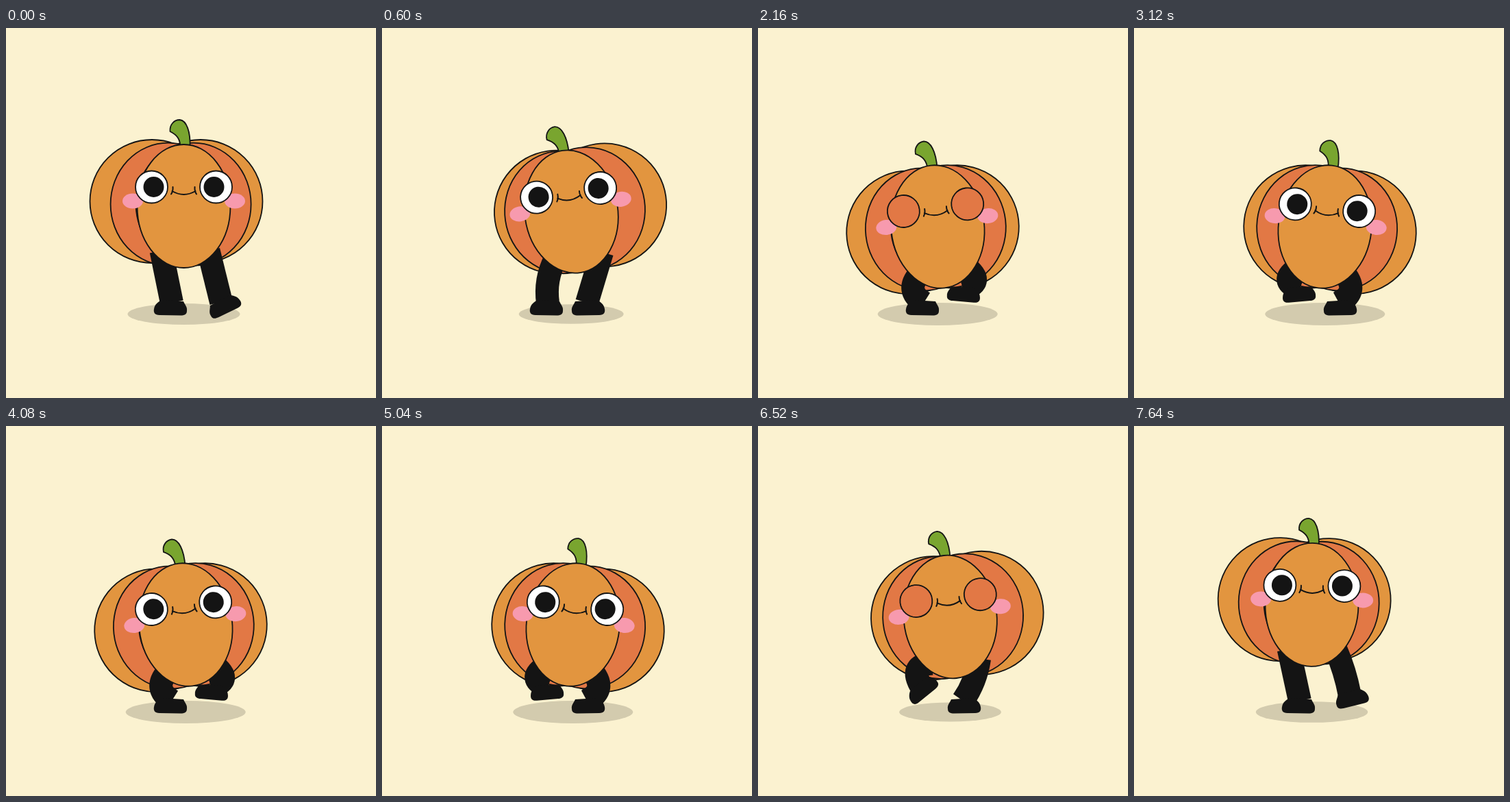
Write an HTML page with a canvas that moves like this. It is 540 px wide and 540 px high and loops after 7.68 s.

```html
<!DOCTYPE html>
<html lang="en">
<head>
<meta charset="utf-8">
<title>Dancing pumpkin</title>
<style>
  html, body { margin: 0; width: 100%; height: 100%; overflow: hidden; background: #fbf2d0; }
  canvas { display: block; width: 540px; height: 540px; }
</style>
</head>
<body>
<canvas id="stage" width="540" height="540"></canvas>
<script>
const ctx = document.getElementById('stage').getContext('2d');
const LOOP = 7680, CYCLE = 1920, HALF = CYCLE / 2, STEP = 40, MID = 270.5;
const INK = '#141414', ORANGE = '#e2953f', RED = '#e27845', GREEN = '#79a52f',
      PINK = '#f79aae', SHADE = '#d3cbae', PAPER = '#fbf2d0';
const BLINKS = [2160, 6520];

// Periodic monotone spline through [time, value] keys.
function track(keys, period) {
  const n = keys.length;
  const at = i => {
    const turn = Math.floor(i / n), k = keys[i - turn * n];
    return [k[0] + turn * period, k[1]];
  };
  const rise = i => (at(i + 1)[1] - at(i)[1]) / (at(i + 1)[0] - at(i)[0]);
  const slope = i => {
    const a = rise(i - 1), b = rise(i);
    return a * b <= 0 ? 0 : 2 * a * b / (a + b);
  };
  return time => {
    const t = ((time % period) + period) % period;
    let i = n - 1;
    while (i > 0 && keys[i][0] > t) i--;
    const [t0, v0] = at(i), [t1, v1] = at(i + 1);
    const d = t1 - t0, u = (t - t0) / d, w = 1 - u;
    return v0 * (1 + 2 * u) * w * w + v1 * u * u * (3 - 2 * u) +
           d * u * w * (slope(i) * w - slope(i + 1) * u);
  };
}

// Sways are repeated with the opposite sign in the second half of the cycle.
const sway = keys => track(keys.concat(keys.map(([t, v]) => [t + HALF, -v])), CYCLE);
const bob = keys => track(keys, HALF);

const frontX = sway([[0, -11], [240, -8.3], [480, 1], [760, 10]]);
const hullX = sway([[0, -22], [80, -24], [160, -22.3], [240, -15.5], [320, -7.5],
                    [480, 11], [640, 20], [760, 20.3], [880, 21.7]]);
const tilt = sway([[0, 0], [240, -6.5], [480, -9], [760, -6], [880, -1.6]]);
const frontY = bob([[0, 260], [240, 290], [480, 256], [720, 280], [760, 278.5], [880, 263]]);
const hullY = bob([[0, 253], [240, 294.3], [480, 248], [720, 279], [760, 276.5], [880, 255]]);
const shadowR = bob([[0, 82], [240, 87.5], [480, 80], [740, 74], [880, 81.3]]);

// Right foot: ankle offset, ankle height and foot angle.
const step = i => track([[0, 43.5, 400, -25], [120, 39, 388, -11], [240, 28.5, 381, 6],
  [400, 28.5, 401, 0], [1580, 28.5, 401, 0], [1720, 33.5, 378, 40],
  [1880, 44, 391, -13]].map(k => [k[0], k[i]]), CYCLE);
const footX = step(1), footY = step(2), footA = step(3);

const rad = deg => deg * Math.PI / 180;

function turn(x, y, a) {
  const c = Math.cos(a), s = Math.sin(a);
  return [x * c - y * s, x * s + y * c];
}

function oval(x, y, rx, ry, fill, line, a = 0) {
  ctx.beginPath();
  ctx.ellipse(x, y, rx, ry, a, 0, Math.PI * 2);
  ctx.fillStyle = fill;
  ctx.fill();
  if (line) ctx.stroke();
}

function leg(side, time, front, a) {
  const t = side > 0 ? time : time + HALF;
  const ax = MID + side * footX(t), ay = footY(t);
  const [hx, hy] = turn(side > 0 ? 36 : -33, 65, a);
  const x = front.x + hx, y = front.y + hy;
  const dx = ax - x, dy = ay - y, dist = Math.hypot(dx, dy);
  const bend = Math.sqrt(Math.max(0, 34 * 34 - dist * dist / 4)) * side / dist;

  ctx.beginPath();
  ctx.moveTo(x, y);
  ctx.quadraticCurveTo((x + ax) / 2 + dy * bend, (y + ay) / 2 - dx * bend, ax, ay);
  ctx.lineWidth = 34;
  ctx.stroke();

  ctx.save();
  ctx.translate(ax, ay);
  ctx.scale(side, 1);
  ctx.rotate(rad(footA(t)));
  ctx.beginPath();
  ctx.moveTo(-17, -2);
  ctx.bezierCurveTo(-19, 3, -23, 6, -22, 12);
  ctx.bezierCurveTo(-22, 17, -18, 18.5, -13, 18.5);
  ctx.lineTo(18, 18);
  ctx.bezierCurveTo(25, 18, 27, 14, 26, 9);
  ctx.bezierCurveTo(25, 2, 19, -2, 15, -4);
  ctx.closePath();
  ctx.fillStyle = INK;
  ctx.fill();
  ctx.restore();
}

function stem() {
  ctx.beginPath();
  ctx.moveTo(-5, -85);
  ctx.bezierCurveTo(-5, -98, -10, -104, -20, -109);
  ctx.bezierCurveTo(-21, -119, -14, -126, -6, -126);
  ctx.bezierCurveTo(4, -125, 10, -109, 9, -85);
  ctx.closePath();
  ctx.fillStyle = GREEN;
  ctx.fill();
  ctx.stroke();
}

function eye(side, lid) {
  const x = side * 47, y = -28;
  oval(x, y, 23.5, 23.5, '#fff', false);
  oval(x - side * 3, y, 15, 15, INK, false);
  if (lid > 0) {
    ctx.save();
    ctx.beginPath();
    ctx.arc(x, y, 23.5, 0, Math.PI * 2);
    ctx.clip();
    oval(x, y - 49 * (1 - lid), 24, 24, RED, true);
    ctx.restore();
  }
  ctx.beginPath();
  ctx.arc(x, y, 23.5, 0, Math.PI * 2);
  ctx.stroke();
}

function mouth() {
  ctx.beginPath();
  ctx.moveTo(-17, -22);
  ctx.quadraticCurveTo(0, -12, 17, -22);
  for (const s of [-1, 1]) {
    ctx.moveTo(s * 16, -28);
    ctx.quadraticCurveTo(s * 15.5, -22, s * 18.5, -17.5);
  }
  ctx.lineWidth = 2;
  ctx.stroke();
}

function lidAt(time) {
  const gap = Math.min(...BLINKS.map(b => Math.abs(time - b)));
  const u = Math.max(0, Math.min(1, (180 - gap) / 100));
  return u * u * (3 - 2 * u);
}

function draw(time) {
  const a = rad(tilt(time));
  const front = { x: MID + frontX(time), y: frontY(time) };
  const hull = { x: MID + hullX(time), y: hullY(time) };
  const rib = { x: hull.x + (front.x - hull.x) * 0.6, y: hull.y + (front.y - hull.y) * 0.6 };
  const r = shadowR(time);

  ctx.fillStyle = PAPER;
  ctx.fillRect(0, 0, 540, 540);
  oval(front.x, 417.5, r, r * 0.188, SHADE, false);

  ctx.strokeStyle = INK;
  ctx.lineCap = ctx.lineJoin = 'round';
  ctx.lineWidth = 1.8;
  const lobes = (c, gap, rx, ry, fill) => {
    for (const s of [-1, 1]) {
      const [x, y] = turn(s * gap, 0, a);
      oval(c.x + x, c.y + y, rx, ry, fill, true, a);
    }
  };
  lobes(hull, 35.5, 90.5, 90, ORANGE);
  lobes(rib, 18.5, 84, 89.5, RED);

  ctx.lineCap = 'butt';
  leg(-1, time, front, a);
  leg(1, time, front, a);

  ctx.save();
  ctx.translate(front.x, front.y);
  ctx.rotate(a);
  ctx.lineCap = 'round';
  ctx.lineWidth = 1.8;
  stem();
  oval(0, 0, 68, 90, ORANGE, true);
  for (const s of [-1, 1]) oval(s * 74.5, -7.5, 15, 11, PINK, false);
  const lid = lidAt(time);
  eye(-1, lid);
  eye(1, lid);
  mouth();
  ctx.restore();
}

const start = performance.now();
function frame() {
  const t = (performance.now() - start) % LOOP;
  draw(Math.floor(t / STEP) * STEP);
  requestAnimationFrame(frame);
}
frame();
</script>
</body>
</html>
```
